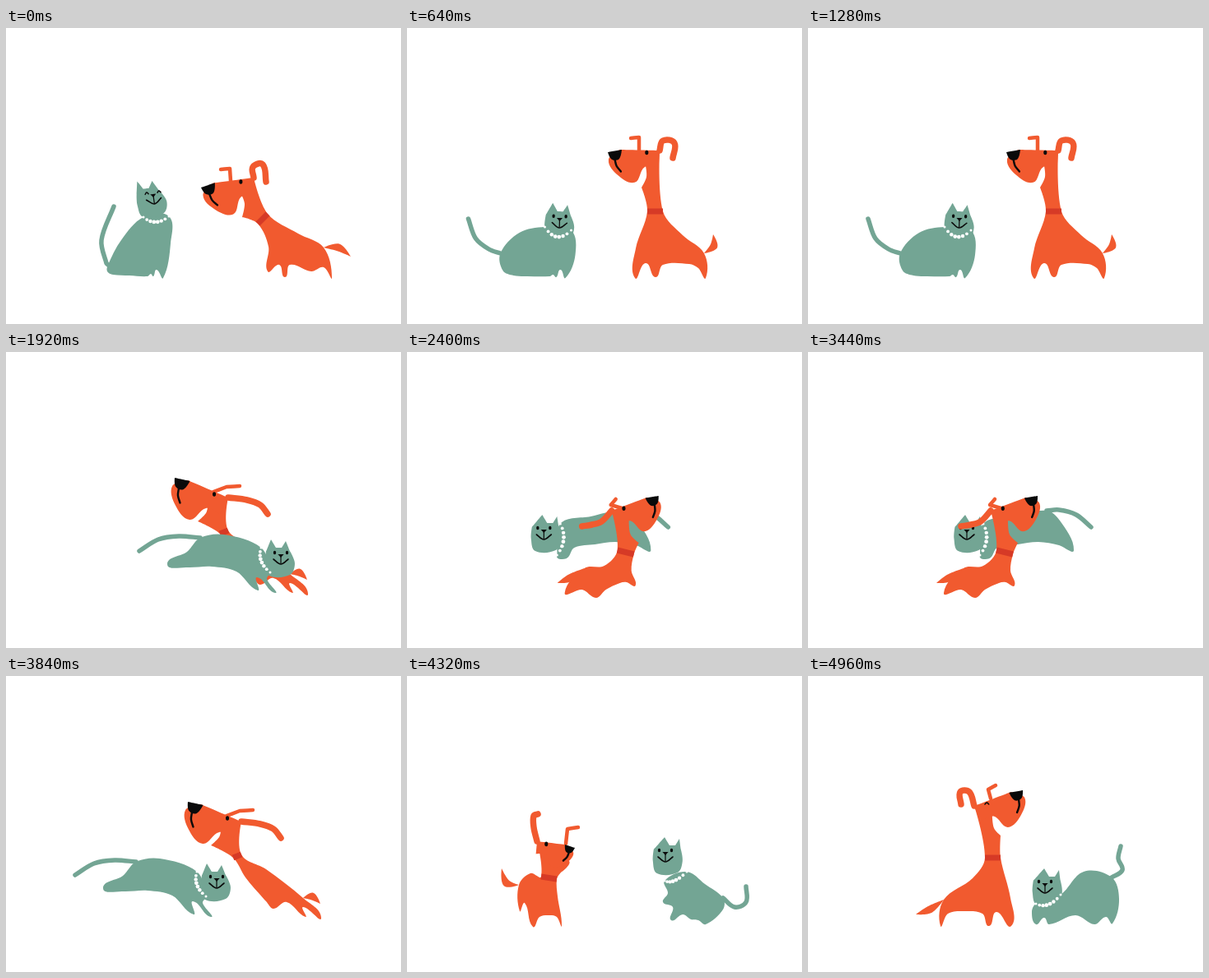
Recreate the animation shown at these times as an HTML page with a canvas. Size 480x360 px, loop 5040 ms.

```html
<!DOCTYPE html>
<html lang="en">
<head>
<meta charset="utf-8">
<title>Cat and dog</title>
<style>
html, body { margin: 0; width: 100%; height: 100%; overflow: hidden; background: #fff; }
canvas { display: block; width: 100vw; height: 100vh; }
</style>
</head>
<body>
<canvas id="stage" width="480" height="360"></canvas>
<script>
const STEP = 80, STEPS = 63;
const TEAL = '#73a594', ORANGE = '#f15a2f', RED = '#d63a26', BLACK = '#0a0a0a';
const ctx = document.getElementById('stage').getContext('2d');

// cat: body | tail | middle pearl | face x, y, degrees, ear shift, eyes open
// dog: body from collar to throat | nose tip, crown, eye state | ear | flap | tail
const parse = s => s.split('|').map(p => p.trim().split(/[\s,]+/).map(Number));
const pose = (cat, dog) => ({ cat: parse(cat), dog: parse(dog) });

const sit = pose(
  `167,230 140,258 124,288 123,296 130,300 150,301 172,302 176,299 179,302 183,294 191,304 200,262 198,229
  |131,217 116,258 122,286 | 182,236 | 179,204 -8 -8 0`,
  `318,226 355,250 386,267 396,304 386,291 371,296 345,288 339,303 332,288 318,296 319,266 306,238 287,230 290,214
  |237,194 301,182 2 | 300,169 312,166 316,187 | 273,186 272,171 261,172 | 404,267 419,278`);
const crouch = pose(
  `166,242 135,249 112,274 115,295 128,301 145,302 172,302 176,300 180,303 185,294 191,304 203,276 198,246
  |73,232 82,256 98,269 | 181,254 | 184,233 2 0 1`,
  `308,223 332,252 358,274 360,304 351,292 340,287 308,288 299,303 287,286 274,304 275,268 289,223 282,194 288,181
  |241,151 304,149 2 | 308,137 322,140 320,158 | 279,150 279,133 269,134 | 370,265 369,251`);
const leap = pose(
  `310,238 265,222 236,226 220,243 196,258 220,262 250,261 280,267 306,290 305,274 327,293 317,276 321,268
  |162,242 185,228 210,224 | 310,254 | 334,248 0 -3 1`,
  `270,217 300,235 345,270 367,294 345,281 348,293 325,275 309,283 300,274 298,272 275,245 260,221 233,206 243,196
  |205,153 270,177 2 | 293,180 309,186 318,197 | 252,170 268,164 284,163 | 356,268 366,277`);
const turn = pose(
  `229,232 190,225 152,238 132,262 122,302 141,283 165,279 205,275 214,280 228,264 232,281 243,262 253,251
  |88,282 108,279 128,256 | 237,247 | 247,225 -24 -4 1`,
  `337,243 322,255 307,263 302,304 316,289 328,286 337,296 341,302 344,287 352,298 357,275 356,250 362,225 362,212
  |363,199 320,209 0 | 358,204 356,180 338,168 | 332,205 329,185 317,185 | 290,262 274,262`);
const chase = pose(
  `213,209 250,200 290,193 306,205 323,241 305,235 280,231 255,234 230,238 222,250 213,252 209,250 209,247
  |344,213 326,198 305,192 | 217,228 | 193,218 0 7 1`,
  `229,241 213,260 189,263 165,293 186,289 203,299 215,289 232,281 240,280 251,284 246,266 249,246 255,232 245,222
  |279,175 222,193 2 | 210,206 198,210 186,212 | 238,191 221,186 227,179 | 171,275 156,281`);
const land = pose(
  `340,238 362,253 384,270 384,284 363,302 354,297 345,296 335,290 321,297 323,281 311,275 317,264 313,249
  |412,256 412,275 398,281 | 325,249 | 314,216 0 8 1`,
  `163,244 150,240 136,254 137,286 143,276 153,305 161,293 174,291 182,293 188,304 183,268 182,247 187,239 197,225
  |204,209 158,201 2 | 154,184 154,170 159,168 | 193,204 195,186 208,184 | 121,252 115,234`);
const stand = pose(
  `307,266 335,238 369,245 378,271 370,301 362,293 348,302 325,291 293,302 287,294 277,302 272,287 277,277
  |380,207 377,222 382,236 | 292,278 | 288,254 0 8 1`,
  `215,221 200,246 165,272 161,304 170,289 190,286 212,289 220,304 229,287 247,304 246,270 234,221 234,194 226,185
  |261,139 202,158 1 | 196,141 185,141 186,156 | 222,149 219,138 228,133 | 148,284 131,290`);

// step, pose, cat shift, dog shift
const lap = [
  [0, leap, -78, 16], [2, leap, 0, 0], [4, leap, 30, -60], [5, land, -31, -52],
  [7, chase, 0, 0], [10, chase, -80, 80], [11, turn, -16, 18], [13, turn, 0, 0]
];
const run = (from, to) => lap.map(([s, ...rest]) => [s + from, ...rest]).filter(key => key[0] < to);
const KEYS = [
  [0, sit, 0, 0], [3, sit, 0, 0], [7, crouch, 0, 0], [11, crouch, 6, 12],
  [16, crouch, 0, 0], [19, crouch, -14, 13],
  ...run(22, 36), ...run(36, 48), ...run(48, 53),
  [53, land, 10, 0], [54, land, 0, 0], [57, land, 4, 4], [61, stand, 0, 0], [STEPS, stand, 0, 0]
];

const lerp = (a, b, k) => a + (b - a) * k;
const mix = (a, b, k) => a.map((part, i) => part.map((v, j) => lerp(v, b[i][j], k)));

// Smooth curve through points; listed indices stay sharp.
function curve(v, closed, corners = []) {
  const n = v.length / 2;
  const at = i => {
    const j = closed ? (i + n) % n : Math.max(0, Math.min(n - 1, i));
    return [v[2 * j], v[2 * j + 1]];
  };
  const tangent = i => {
    if (corners.includes((i + n) % n)) return [0, 0];
    const [ax, ay] = at(i - 1), [bx, by] = at(i + 1);
    const d = Math.hypot(bx - ax, by - ay) || 1;
    return [(bx - ax) / d, (by - ay) / d];
  };
  ctx.beginPath();
  ctx.moveTo(v[0], v[1]);
  for (let i = 0; i < (closed ? n : n - 1); i++) {
    const [x, y] = at(i), [X, Y] = at(i + 1);
    const [ux, uy] = tangent(i), [wx, wy] = tangent(i + 1);
    const h = Math.hypot(X - x, Y - y) * 0.33;
    ctx.bezierCurveTo(x + ux * h, y + uy * h, X - wx * h, Y - wy * h, X, Y);
  }
  if (closed) ctx.closePath();
}

function shape(v, color, corners) {
  curve(v, true, corners);
  ctx.fillStyle = color;
  ctx.fill();
}

function line(v, color, width, cap = 'round', corners) {
  curve(v, false, corners);
  ctx.strokeStyle = color;
  ctx.lineWidth = width;
  ctx.lineCap = cap;
  ctx.lineJoin = 'round';
  ctx.stroke();
}

function dot(x, y, rx, ry, color) {
  ctx.beginPath();
  ctx.ellipse(x, y, rx, ry, 0, 0, 7);
  ctx.fillStyle = color;
  ctx.fill();
}

function eye(x, y, r, open) {
  if (open) dot(x, y, r * 0.85, r * 1.15, BLACK);
  else line([x - r, y + 1, x, y - 1, x + r, y + 1], BLACK, 1.5);
}

function pearls([x0, y0], [mx, my], [x1, y1]) {
  const cx = 2 * mx - (x0 + x1) / 2, cy = 2 * my - (y0 + y1) / 2;
  for (let i = 0; i < 8; i++) {
    const k = i / 7, q = (a, b, c) => lerp(lerp(a, b, k), lerp(b, c, k), k);
    const r = 1.5 + 0.9 * Math.sin(Math.PI * k);
    dot(q(x0, cx, x1), q(y0, cy, y1), r, r, '#fff');
  }
}

function catHead(s) {
  const c = s * 0.35;
  shape([c - 17, -5, s - 9, -20, s - 3, -10, s + 4, -10, s + 9, -18, s * 0.7 + 13, -6,
    c + 18, 9, c + 12, 23, c - 13, 24, c - 18, 9], TEAL, [0, 1, 2, 3, 4, 5]);
}

function catFace(open) {
  eye(-7.5, -4, 2, open);
  eye(7.5, -4, 2, open);
  shape([-3.5, -2, 3.5, -2, 0, 2], BLACK, [0, 1, 2]);
  line([0, 0, 0, 9], BLACK, 1.2);
  line([-9, 4, 0, 10, 9, 4], BLACK, 1.6);
}

function drawCat([body, tail, bead, [x, y, angle, ears, open]]) {
  const facing = draw => {
    ctx.save();
    ctx.translate(x, y);
    ctx.rotate(angle * Math.PI / 180);
    draw();
    ctx.restore();
  };
  line([...tail, body[4], body[5]], TEAL, 5.5);
  shape(body, TEAL);
  facing(() => catHead(ears));
  pearls(body, bead, body.slice(-2));
  facing(() => catFace(open > 0.5));
}

function leaf(x, y, mx, my, X, Y) {
  const d = Math.hypot(X - x, Y - y) / 4.5 || 1;
  const nx = (y - Y) / d, ny = (X - x) / d;
  shape([x, y, mx + nx, my + ny, X, Y, mx - nx, my - ny], ORANGE, [0, 2]);
}

function drawDog([body, [x, y, X, Y, look], ear, flap, tail]) {
  // Head coordinates: u runs from nose to crown, v runs down to the jaw.
  const dx = X - x, dy = Y - y, side = dx < 0 ? -1 : 1;
  const local = (...v) => v.map((_, i) => i % 2
    ? y + v[i - 1] * dy + v[i] * dx * side
    : x + v[i] * dx - v[i + 1] * dy * side);

  leaf(body[4], body[5], ...tail);
  shape([...body, ...local(0.72, 0.28), X, Y], ORANGE, [12, 14, 15]);
  line([X, Y, ...ear], ORANGE, 7.5);
  line(flap, ORANGE, 4.5, 'round', [1]);
  shape(local(0.24, -0.04, 1, 0, 0.97, 0.33, 0.7, 0.31, 0.5, 0.6, 0.18, 0.45, 0.01, 0.15),
    ORANGE, [0, 1, 2]);
  line([body[0], body[1], body[22], body[23]], RED, 7, 'butt');
  if (look < 0.5) return;
  shape(local(0, 0, 0.27, -0.04, 0.21, 0.14, 0.07, 0.14), BLACK, [0, 1]);
  line(local(0.13, 0.14, 0.16, 0.27, 0.24, 0.38), BLACK, 2.4);
  eye(...local(0.75, 0.03), 2.4, look > 1.5);
}

function place(draw, parts, dx) {
  ctx.save();
  ctx.translate(dx, 0);
  draw(parts);
  ctx.restore();
}

function render(step) {
  const i = KEYS.findIndex(key => key[0] > step);
  const [s, a, catA, dogA] = KEYS[i - 1], [e, b, catB, dogB] = KEYS[i];
  const k = (step - s) / (e - s);
  const cat = () => place(drawCat, mix(a.cat, b.cat, k), lerp(catA, catB, k));
  const dog = () => place(drawDog, mix(a.dog, b.dog, k), lerp(dogA, dogB, k));
  const dogInFront = a === chase || b === chase;
  ctx.fillStyle = '#fff';
  ctx.fillRect(0, 0, 480, 360);
  (dogInFront ? [cat, dog] : [dog, cat]).forEach(draw => draw());
}

const start = performance.now();
function tick() {
  render(Math.floor((performance.now() - start) / STEP) % STEPS);
  requestAnimationFrame(tick);
}
tick();
</script>
</body>
</html>
```
